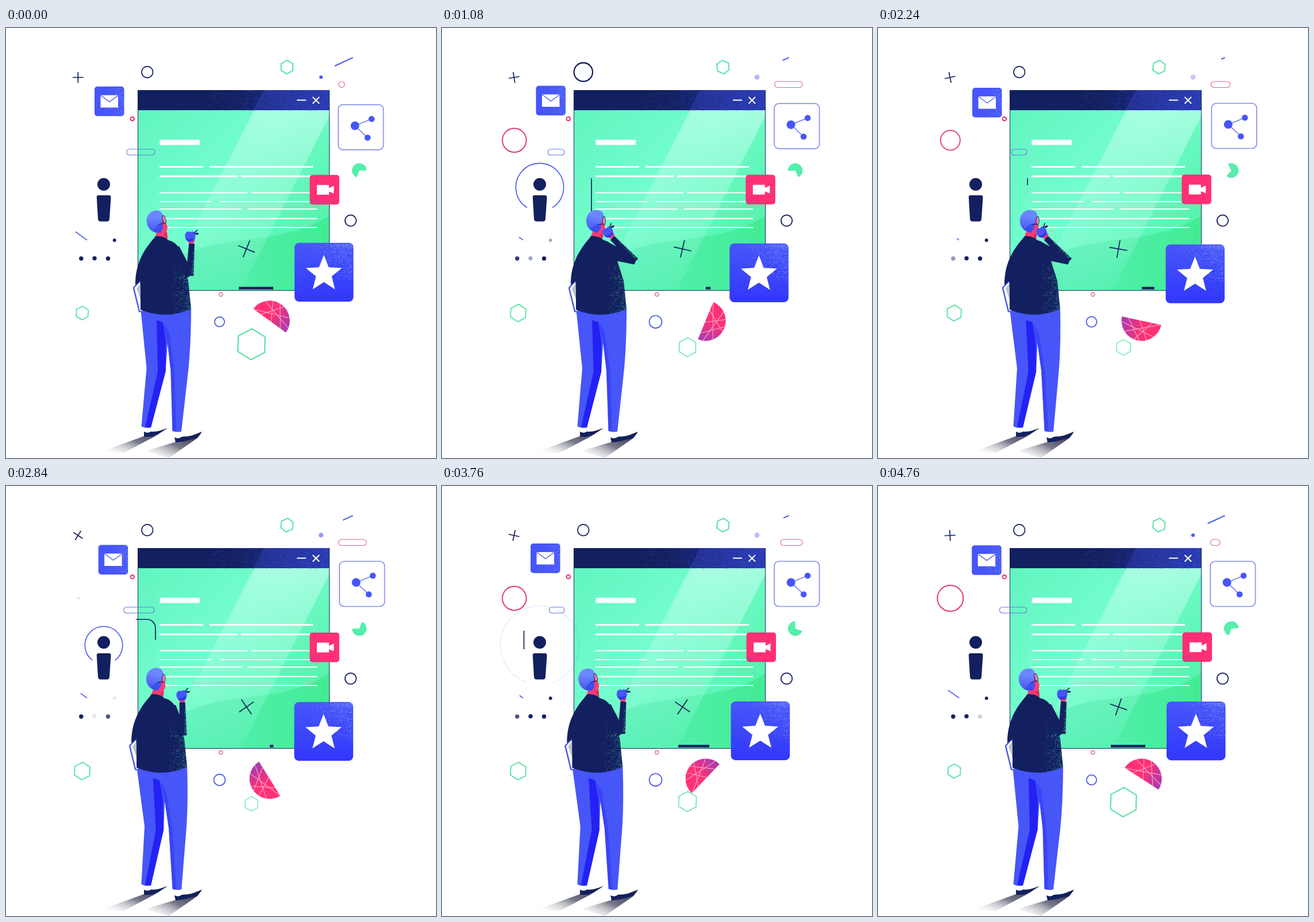
Animation of 748 by 748 pixels, one loop 4800 ms. Source, as an HTML page:

```html
<!DOCTYPE html>
<html lang="en">
<head>
<meta charset="utf-8">
<title>Reader at a screen</title>
<style>
html,body{margin:0;width:100%;height:100%;overflow:hidden;background:#fff}
svg{display:block;width:100vw;height:100vh}
</style>
</head>
<body>
<svg viewBox="0 0 748 748" fill="none">
<defs>
  <linearGradient id="gBody" x1="0" y1="0" x2="1" y2="1">
    <stop offset="0" stop-color="#5ff4be"/><stop offset=".45" stop-color="#74fdce"/><stop offset="1" stop-color="#48ed9c"/>
  </linearGradient>
  <linearGradient id="gHead"><stop offset=".5" stop-color="#13205f"/><stop offset="1" stop-color="#2535a8"/></linearGradient>
  <linearGradient id="gBand" x1="0" y1="0" x2="0" y2="1">
    <stop offset="0" stop-color="#c8ffee" stop-opacity=".6"/><stop offset=".55" stop-color="#b4ffe8" stop-opacity=".35"/><stop offset="1" stop-color="#a0ffe0" stop-opacity=".1"/>
  </linearGradient>
  <linearGradient id="gWave"><stop offset="0" stop-color="#5af0bd"/><stop offset=".45" stop-color="#52efb0"/><stop offset="1" stop-color="#42ec92"/></linearGradient>
  <linearGradient id="gStar" x1="0" y1="0" x2="0" y2="1"><stop offset="0" stop-color="#4657f8"/><stop offset="1" stop-color="#3237fb"/></linearGradient>
  <linearGradient id="gHalf" x1="0" y1="0" x2="0" y2="1"><stop offset=".45" stop-color="#ff3176"/><stop offset="1" stop-color="#a63bb0"/></linearGradient>
  <linearGradient id="gHair" x1="0" y1="0" x2="0" y2="1"><stop offset=".3" stop-color="#6c86ff"/><stop offset="1" stop-color="#4354ef"/></linearGradient>
  <linearGradient id="gShade" x1="1" y1="0" x2="0" y2="1"><stop offset="0" stop-color="#25273c"/><stop offset=".5" stop-color="#77798a"/><stop offset="1" stop-color="#fff" stop-opacity="0"/></linearGradient>
  <clipPath id="cWin"><path d="M229 108H563V457H229Z"/></clipPath>
  <clipPath id="cTorso"><path d="M259 364Q272 360 283 370L306 405L317 440L322 489Q278 508 234 490V400Z"/></clipPath>
</defs>

<g clip-path="url(#cWin)">
  <path fill="url(#gBody)" d="M229 108H563V457H229Z"/>
  <path fill="url(#gWave)" d="M229 415Q300 398 335 384C400 362 500 372 563 325V457H229Z"/>
  <path fill="url(#gBand)" d="M432 143H563V152L408 457H270Z"/>
  <path fill="url(#gHead)" d="M229 108H563V143H229Z"/>
  <path fill="#3f52dd" opacity=".3" d="M449 108H563V143H430Z"/>
  <g id="headGrain"></g>
</g>
<path stroke="#17305c" d="M229.500 143V456.500H562.500V108"/>
<path stroke="#fff" stroke-width="2" d="M506 125.500H522M533.500 120L545 131.500M545 120L533.500 131.500"/>
<path fill="#fff" d="M267.500 194.500H337V203.500H267.500Z"/>
<path stroke="#fff" stroke-width="3.200" d="M267 241.500H343M354 241.500H534M267 258H403M409 258H540"/>
<path stroke="#fff" stroke-width="2" d="M267 286.500H420M427 286.500H541M267 302H357M373 302H541M267 315H410M421 315H541M267 331.500H541M267 347H541"/>
<path id="bar" stroke="#13205f" stroke-width="4.500"/>
<path id="crossBig" stroke="#13205f" stroke-width="1.700" d="M-15.500 0H15.500M0 -15.500V15.500"/>
<path id="trace" stroke="#13205f" stroke-width="1.700" d="M245 348A15 15 0 0 0 260 333V247A15 15 0 0 0 245 232H157.500A15 15 0 0 0 142.500 247V284"/>

<path id="crossSmall" stroke="#13205f" stroke-width="1.700" d="M-9.500 0H9.500M0 -9.500V9.500"/>
<circle id="ringNavy" cx="245.800" cy="76.700" stroke="#13205f"/>
<path id="hexTop" stroke="#5be3a6"/>
<path id="dashTop" stroke="#4656ea" stroke-width="2"/>
<path id="dashLeft" stroke="#4656ea" stroke-width="1.600"/>
<circle id="dotTop" cx="548" cy="85.500" fill="#4656f4"/>
<rect id="pillPink" y="93" height="10.500" rx="5.250" stroke="#e0628c" stroke-width="1.100"/>
<rect id="pillBlue" y="210.700" height="10.300" rx="5.150" stroke="#6878da" stroke-width="1.100"/>
<circle cx="219.800" cy="158" r="3.300" stroke="#e8326d" stroke-width="2"/>
<circle cx="373.700" cy="463.500" r="3.100" stroke="#e0547f" stroke-width="1.200"/>
<circle cx="599.500" cy="335" r="9.700" stroke="#13205f" stroke-width="1.800"/>
<circle id="ringBlue" cx="371.500" cy="511.200" stroke="#4656e0" stroke-width="1.700"/>
<circle id="ringPink" cx="125.800" cy="195.300" stroke="#e3356f"/>
<path id="wave" stroke="#4656ea" stroke-width="1.600"/>
<circle cx="170" cy="272" r="11" fill="#13205f"/>
<path fill="#13205f" d="M161 291H179.500Q182.700 291 182.500 295L180 332Q179.500 336.500 176 336.500H164.500Q160.500 336.500 160 332L157.800 295Q157.500 291 161 291Z"/>
<g id="dots" fill="#13205f">
  <circle cx="130.800" cy="401" r="3.700"/><circle cx="154" cy="400.600" r="3.700"/>
  <circle cx="177.500" cy="401" r="3.700"/><circle cx="188.700" cy="369.200" r="2.900"/>
</g>
<path id="hexLeft" stroke="#5be3a6"/>
<path id="pie" fill="#55eeab"/>
<g id="half">
  <path fill="url(#gHalf)" d="M0 -35A35 35 0 0 1 0 35Z"/>
  <path stroke="#ffd3e3" opacity=".8" d="M0 -34L24 25M23 -26L9 33M0 -19L34 6M0 3L31 -15M0 23L35 -3"/>
</g>
<path id="hexBig" stroke="#5be3a6"/>

<g id="mail">
  <rect width="51.500" height="51.500" rx="5" fill="#4656f8"/>
  <g id="mailGrain"></g>
  <path fill="#fff" d="M10.500 15H41V36.500H10.500Z"/><path stroke="#5362e8" stroke-width="1.400" d="M11 15.500L26 26.500L41 15.500"/>
</g>
<g id="share">
  <rect width="78.500" height="78.500" rx="8" fill="#fff" stroke="#8590ee" stroke-width="1.700"/>
  <path stroke="#7480ea" stroke-width="1.600" d="M51 57.500L29 36.700L58 25"/>
  <g fill="#4656f8"><circle cx="29" cy="36.700" r="7.500"/><circle cx="58" cy="25" r="5.300"/><circle cx="51" cy="57.500" r="5.300"/></g>
</g>
<g id="cam">
  <rect width="51.500" height="51.500" rx="5" fill="#ff3074"/>
  <g id="camGrain"></g>
  <path fill="#fff" d="M12.500 17.500H33.500V23L42 19V32.500L33.500 29V34.500H12.500Z"/>
</g>
<g id="star">
  <rect width="102.500" height="102.300" rx="8" fill="url(#gStar)"/>
  <g id="starGrain"></g>
  <path id="starShape" fill="#fff"/>
</g>

<path fill="url(#gShade)" d="M240 710L281 696L258 711L205 739L163 738Z"/>
<path fill="url(#gShade)" d="M295 720L341 702L332 714L283 748L243 736Z"/>
<path fill="#fff" d="M239 690H253V704H239ZM291 698H305V714H292Z"/>
<path fill="#13205f" d="M240 702Q246 706 252 702Q266 703 280 696L264 707L252 711H240Z"/>
<path fill="#13205f" d="M293 712Q300 716 306 711Q322 711 340 704L333 713L310 719L295 721Z"/>
<g id="legs">
  <path fill="#4656f8" d="M234 486H322Q322 545 317.500 592L305 702Q297 704 289.500 701L286.500 596L281 548L277.500 598L252 695Q243 697 235.500 693L244.500 592Z"/>
  <path fill="#2321f4" d="M262 508L273 512L278 545L277.500 598L252 695L242 694L264 598Z"/>
  <path fill="#343df6" opacity=".7" d="M273 512L284 530L293 598L296 702L289.500 701L286.500 596L281 548Z"/>
  <g id="legGrain"></g>
</g>
<g id="upper">
  <path fill="#fff" stroke="#4959e6" stroke-width="2.500" d="M222 452L234 439L238 494L232 493Z"/>
  <path fill="#8f94a8" opacity=".6" d="M227 453L234 444L236 478Z"/>
  <g id="head">
    <path fill="#ff3b72" d="M262 350L279 350L281 369Q268 366 260 364Z"/>
    <path fill="#e0245e" d="M274 358L280 355L281 367Z"/>
    <path fill="#ff3b72" d="M270 324Q277 326 277 336L281 346Q280 357 272 357L264 354Z"/>
    <path fill="url(#gHair)" d="M245 339C243 326 252 317.500 262 317.500Q271 317.500 273 326L273 335Q267 341 274 347Q271 350 270 356C256 358 247 350 245 339Z"/>
    <path fill="#3342e8" opacity=".6" d="M262 344L273 337V348L268 356L256 354Z"/>
    <ellipse cx="275" cy="333" rx="2.700" ry="7" transform="rotate(-14 275 333)" fill="#fff" fill-opacity=".3" stroke="#13205f"/>
    <path stroke="#13205f" d="M266 342L276 339"/>
  </g>
  <path fill="#13205f" d="M258 365Q259 361 265 362Q277 363 282 369Q296 372 301 384L306 405L317 440L322 489Q278 508 234 490V440L225 447C225 420 232 394 258 365Z"/>
  <g clip-path="url(#cTorso)" id="torsoGrain"></g>
  <circle id="hand" r="6" fill="#ff3b72"/>
  <path id="arm" fill="#13205f" stroke="#13205f" stroke-width="2" stroke-linejoin="round"/>
  <g id="armGrain"></g>
  <g id="apple">
    <path fill="#4656f8" d="M-8 -4Q-5 -10 1 -7Q7 -10 9 -4Q11 3 6 8Q0 11 -5 8Q-10 4 -8 -4Z"/>
    <path fill="#3038ea" d="M-7 4Q0 7 8 2L6 8Q0 11 -5 8Z"/>
    <path fill="#13205f" d="M8 -4Q11 -8 16 -4Q12 -1 8 -4Z"/>
    <path stroke="#13205f" stroke-width="1.700" d="M7 -5L13 -11"/>
  </g>
</g>
</svg>
<script>
const LOOP = 4800, STEP = 40;
const { PI, sin, cos, min, max, abs, floor } = Math;
const $ = id => document.getElementById(id);
const set = (id, attrs) => { for (const k in attrs) $(id).setAttribute(k, attrs[k]); };
const move = (id, x, y, r = 0) => set(id, { transform: `translate(${x} ${y}) rotate(${r})` });

// Timing rules, all functions of time in ms.
const clamp = p => min(1, max(0, p));
const ramp = (t, from, to) => { const p = clamp((t - from) / (to - from)); return p * p * (3 - 2 * p); };
const bump = (t, mid, half) => abs(t - mid) < half ? cos((t - mid) / half * PI / 2) ** 2 : 0;
const swing = (t, period, peak = 0) => cos(2 * PI * (t - peak) / period);
const zigzag = (t, period) => 1 - abs(1 - t % period / period * 2);

const polar = (r, deg) => [r * cos(deg * PI / 180), r * sin(deg * PI / 180)];
function ngon(cx, cy, n, radius, rot = 0) {
  const pts = [];
  for (let i = 0; i < n; i++) {
    const [x, y] = polar(radius(i), rot - 90 + i * 360 / n);
    pts.push((cx + x).toFixed(2) + ' ' + (cy + y).toFixed(2));
  }
  return 'M' + pts.join('L') + 'Z';
}
const hex = (id, x, y, r, rot, w) => set(id, { d: ngon(x, y, 6, () => r, rot), 'stroke-width': w });
const pill = (id, left, right) => set(id, { x: left, width: right - left });

let seed = 7;
function rnd() {
  seed = (seed * 1664525 + 1013904223) >>> 0;
  return seed / 4294967296;
}
// Specks in a box, denser towards the right (bx) and bottom (by) for larger powers.
function grain(id, x, y, w, h, n, color, bx = 1, by = 1) {
  let d = '';
  for (let i = 0; i < n; i++) {
    const px = x + w * rnd() ** (1 / bx), py = y + h * rnd() ** (1 / by);
    d += `M${px.toFixed(1)} ${py.toFixed(1)}h1v1h-1z`;
  }
  $(id).innerHTML += `<path fill="${color}" opacity=".65" d="${d}"/>`;
}

// Outline of an arm segment, wa and wb being its half widths.
function limb([ax, ay], [bx, by], wa, wb) {
  const len = Math.hypot(bx - ax, by - ay), nx = (ay - by) / len, ny = (bx - ax) / len;
  return `M${ax + nx * wa} ${ay + ny * wa}L${bx + nx * wb} ${by + ny * wb}` +
    `L${bx - nx * wb} ${by - ny * wb}L${ax - nx * wa} ${ay - ny * wa}Z`;
}

function drawSpinners(t) {
  const turn = 360 * t / LOOP;
  const lag = bump(t, 2400, 2300);
  move('crossSmall', 125.3, 86, turn);
  move('crossBig', 418.3, 384.3, 22 + turn);
  move('half', 458.6, 509.2, -54 + turn - 12 * lag);
  hex('hexTop', 488.8, 68, 11.8, 66 * ramp(t, 0, 1500), 2);

  const mouth = 55 + turn - 36 * lag, r = 12.7;
  const [ax, ay] = polar(r, mouth + 56), [bx, by] = polar(r, mouth - 56);
  set('pie', { d: `M614.600 248L${614.6 + ax} ${248 + ay}A${r} ${r} 0 1 1 ${614.6 + bx} ${248 + by}Z` });
}

function drawPulses(t) {
  // Short lines wipe away and back three times per loop.
  const cut = zigzag(t, LOOP / 3), blink = t % (LOOP / 3);
  set('dashTop', { d: `M${572 + 31.5 * cut} ${66 - 14.7 * cut}L603.500 51.300` });
  set('dashLeft', { d: `M${121 + 20 * cut} ${354.5 + 14.3 * cut}L141 368.800` });
  set('dotTop', { r: 3 + 2 * cut, opacity: 1 - .87 * cut });
  [800, 1220, 1480, 1220].forEach((mid, i) =>
    $('dots').children[i].setAttribute('opacity', 1 - .9 * bump(blink, mid, 370)));

  // Pills and rings breathe twice per loop.
  const a = t % (LOOP / 2), swell = sin(PI * a / (LOOP / 2)), full = min(1, 3 * swell);
  pill('pillPink', 578.5 + 26 * bump(a, 1700, 600), 589 + 38 * full);
  pill('pillBlue', 209.7 - 26 * bump(a, 1150, 1000) + 40 * bump(a, 2100, 300),
    259 - 46 * min(1, 2.5 * bump(a, 1020, 620)));
  set('ringBlue', { r: 8.5 + 2.5 * swell });
  hex('hexLeft', 132.6, 495.8, 11.8 + 3.4 * full, 3, 1.9);

  const edge = min(1, 4 * sin(PI * t / LOOP));
  const rb = 27 - 12 * edge + 2.6 * edge * swing(t, LOOP / 2, 1440);
  hex('hexBig', 427, 552.5 + 4 * swing(t, LOOP, 1700), rb, 2, 1.1 + (rb - 12) * .075);

  const beat = bump(t, 1100, 1150);
  set('ringNavy', { r: 9.8 + 6.4 * beat, 'stroke-width': 1.7 + .6 * beat });

  // Grows three times and keeps its last size.
  const born = 80 + 1340 * min(2, floor(max(0, t - 80) / 1340));
  const rp = min(22.5, max(0, t - born) / 48);
  set('ringPink', { r: rp, 'stroke-width': .8 + rp * .053, opacity: rp > 0 ? min(1, .3 + rp * .05) : 0 });
}

// Two circles spread out from the figure icon, leaving room for its body.
function drawWave(t) {
  const p = (t - (t < 2520 ? 600 : 2520)) / 1400;
  if (p < 0 || p > 1) return set('wave', { opacity: 0 });
  const r = 12 + 58 * (1 - (1 - p) ** 1.7);
  const gap = Math.asin(min(.6, 22 / r)) * 180 / PI;
  const [x, y] = polar(r, 90 - gap);
  set('wave', {
    d: `M${170 - x} ${277 + y}A${r} ${r} 0 1 1 ${170 + x} ${277 + y}`,
    opacity: min(1, .5 + 4 * p, 9 * (1 - p) ** 2)
  });
}

function drawWindow(t) {
  const left = 405 + 54 * (ramp(t, 0, 1100) - ramp(t, 2840, 4000));
  set('bar', { d: `M${left} 452.500H${465 + 22 * bump(t, 1880, 1000)}` });

  const tail = 88 * ramp(t, 680, 2500) + 193 * ramp(t, 2800, 4100);
  const tip = 95 * ramp(t, 0, 900) + 186 * ramp(t, 2400, 3600);
  set('trace', { 'stroke-dasharray': `0 ${tail} ${max(0, tip - tail)} 999`, opacity: tip - tail > .5 ? 1 : 0 });

  move('mail', 154 + 10 * min(1, .75 * (1 - swing(t, 3700))), 102 - 2 * swing(t, 3000, 720));
  move('share', 578 + 2.4 * bump(t, 2500, 1400), 133.3 - 2.3 * ramp(t, 0, 1500));
  move('cam', 528.3 + 1.2 * ramp(t, 3000, 3800), 255.6 - t / 4000);
  move('star', 501.3 - 1.3 * swing(t, LOOP, 1580), 373.7 + 2.3 * bump(t, 2100, 1700) + t / 4000);
}

function drawMan(t) {
  const lean = -7.6 * (ramp(t, 400, 3400) - ramp(t, 3760, 4700));
  const k = lean / 205;
  set('legs', { transform: `matrix(1 0 ${-k} 1 ${k * 695} 0)` });
  move('upper', lean, 0);

  // The arm blends from looking up (0) to biting (1) along an arc; the head follows it later.
  const up = ramp(t, 120, 600);
  const q = up - ramp(t, 2320, 3100), nod = up - ramp(t, 2600, 3500);
  const blend = (a, b, arc) => a.map((v, i) => v + (b[i] - v) * q + arc[i] * sin(PI * q));
  const elbow = blend([320, 430], [337, 405], [-13, 13]);
  const wrist = blend([323, 376], [298, 366], [-4, 5]);
  const fruit = blend([320, 362], [289, 355], [0, 5]);

  set('head', { transform: `rotate(${nod * 15} 270 363)` });
  set('arm', { d: limb([290, 388], elbow, 13, 5.5) + limb(elbow, wrist, 5.5, 4) });
  set('hand', { cx: wrist[0] * .7 + fruit[0] * .3, cy: wrist[1] * .7 + fruit[1] * .3 - 2 });
  move('apple', ...fruit, -28 * q);
  move('armGrain', ...elbow, Math.atan2(wrist[1] - elbow[1], wrist[0] - elbow[0]) * 180 / PI);
}

function draw(t) {
  drawSpinners(t);
  drawPulses(t);
  drawWave(t);
  drawWindow(t);
  drawMan(t);
}

grain('headGrain', 340, 108, 223, 35, 650, '#3c50d8', 1.6);
grain('headGrain', 430, 108, 133, 35, 300, '#13205f');
grain('mailGrain', 22, 2, 28, 47, 170, '#8995ff', 2);
grain('camGrain', 2, 38, 28, 12, 60, '#a838b8', .6, 2);
grain('starGrain', 25, 2, 76, 62, 520, '#98a4ff', 2.2, .5);
grain('torsoGrain', 284, 410, 38, 88, 420, '#3fae93', 2.5);
grain('armGrain', 2, 1, 46, 4.5, 75, '#4fb9a0', .7, 2);
grain('legGrain', 300, 500, 15, 90, 130, '#5869ff', 1, .8);
set('starShape', { d: ngon(51, 54, 10, i => i % 2 ? 14.3 : 33) });

const start = performance.now();
function frame() {
  draw(floor((performance.now() - start) % LOOP / STEP) * STEP);
  requestAnimationFrame(frame);
}
frame();
</script>
</body>
</html>
```
